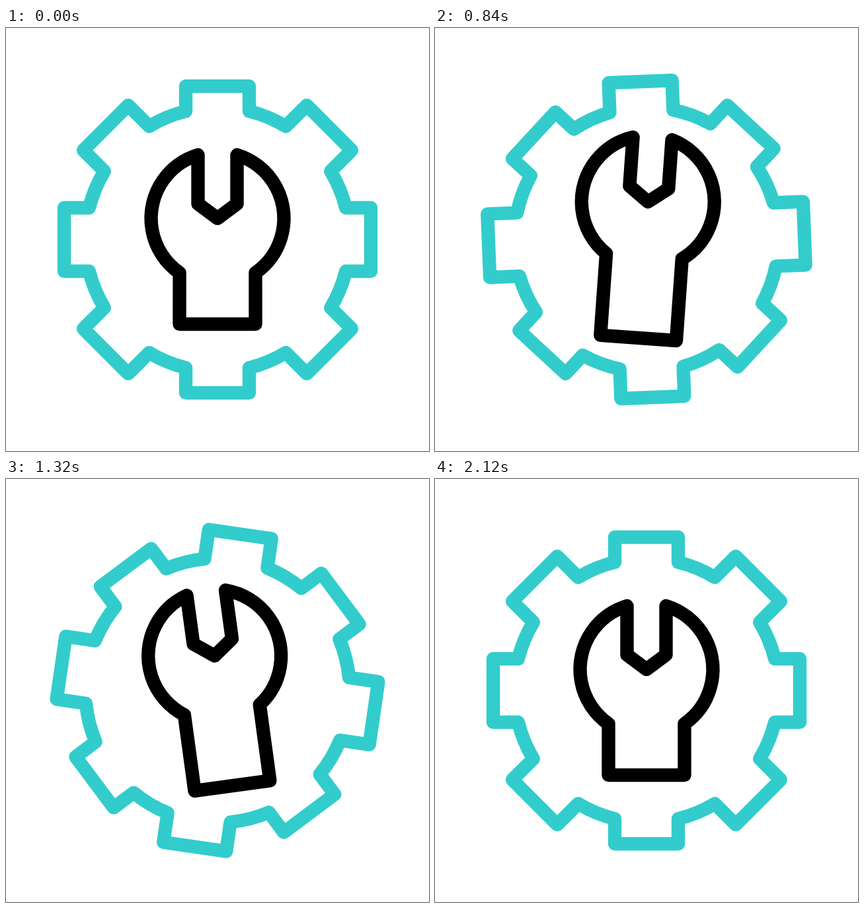
Animation, 640 px wide and 640 px high, one loop 2160 ms. Source, as an HTML page with a canvas:

```html
<!DOCTYPE html>
<html lang="en">
<head>
<meta charset="utf-8">
<title>Gear and wrench</title>
<style>
  html, body { margin: 0; width: 100%; height: 100%; overflow: hidden; background: #fff; }
  canvas { display: block; width: 100vmin; height: 100vmin; margin: auto; }
</style>
</head>
<body>
<canvas id="stage" width="640" height="640"></canvas>
<script>
const ctx = document.getElementById('stage').getContext('2d');
const LOOP = 2160, STEP = 40;
const RAD = Math.PI / 180;

// Symmetric cubic-bezier(.65, 0, .35, 1), solved by bisection.
function ease(u) {
  if (u <= 0) return 0;
  if (u >= 1) return 1;
  let lo = 0, hi = 1;
  for (let i = 0; i < 30; i++) {
    const s = (lo + hi) / 2, r = 1 - s;
    const x = 3 * s * r * r * 0.65 + 3 * s * s * r * 0.35 + s * s * s;
    if (x < u) lo = s; else hi = s;
  }
  return lo * lo * (3 - 2 * lo);
}

// Keys are [time, value] pairs.
function track(keys, t) {
  if (t <= keys[0][0]) return keys[0][1];
  for (let i = 1; i < keys.length; i++) {
    const [t0, v0] = keys[i - 1], [t1, v1] = keys[i];
    if (t < t1) return v0 + (v1 - v0) * ease((t - t0) / (t1 - t0));
  }
  return keys[keys.length - 1][1];
}

const gearTurn = [[40, 0], [2080, 180]];
const wrenchTurn = [[40, 0], [690, 5], [1280, -7.75], [2080, 0]];
const stretch = [[40, 0], [980, 1], [1920, 0]];

function gear(angle) {
  ctx.save();
  ctx.translate(320, 320);
  ctx.rotate(angle * RAD);
  ctx.beginPath();
  const inner = 200, half = 48;
  const edge = Math.asin(half / inner);
  const root = Math.sqrt(inner * inner - half * half);
  for (let i = 0; i < 8; i++) {
    const a = i * Math.PI / 4, c = Math.cos(a), s = Math.sin(a);
    const tip = i % 2 ? 239 : 232;
    const to = (x, y) => ctx.lineTo(x * c - y * s, x * s + y * c);
    to(-half, -root);
    to(-half, -tip);
    to(half, -tip);
    to(half, -root);
    const mid = a - Math.PI / 2;
    ctx.arc(0, 0, inner, mid + edge, mid + Math.PI / 4 - edge);
  }
  ctx.closePath();
  ctx.strokeStyle = '#33cccc';
  ctx.stroke();
  ctx.restore();
}

function wrench(angle, grow) {
  const foot = 128 + 47.4 * grow;
  const cy = -32, r = 100.5;
  ctx.save();
  ctx.translate(320, 320 - 25.6 * grow);
  ctx.rotate(angle * RAD);
  ctx.beginPath();
  ctx.moveTo(0, cy);
  ctx.lineTo(29.5, -54);
  ctx.lineTo(29.5, -128);
  ctx.arc(0, cy, r, Math.atan2(-96, 29.5), Math.atan2(82.5, 57.5));
  ctx.lineTo(57.5, foot);
  ctx.lineTo(-57.5, foot);
  ctx.arc(0, cy, r, Math.atan2(82.5, -57.5), Math.atan2(-96, -29.5));
  ctx.lineTo(-29.5, -54);
  ctx.closePath();
  ctx.strokeStyle = '#000';
  ctx.stroke();
  ctx.restore();
}

function draw() {
  const t = Math.floor((performance.now() % LOOP) / STEP) * STEP;
  ctx.fillStyle = '#fff';
  ctx.fillRect(0, 0, 640, 640);
  ctx.lineWidth = 20.4;
  ctx.lineJoin = ctx.lineCap = 'round';
  gear(track(gearTurn, t));
  wrench(track(wrenchTurn, t), track(stretch, t));
  requestAnimationFrame(draw);
}
draw();
</script>
</body>
</html>
```
